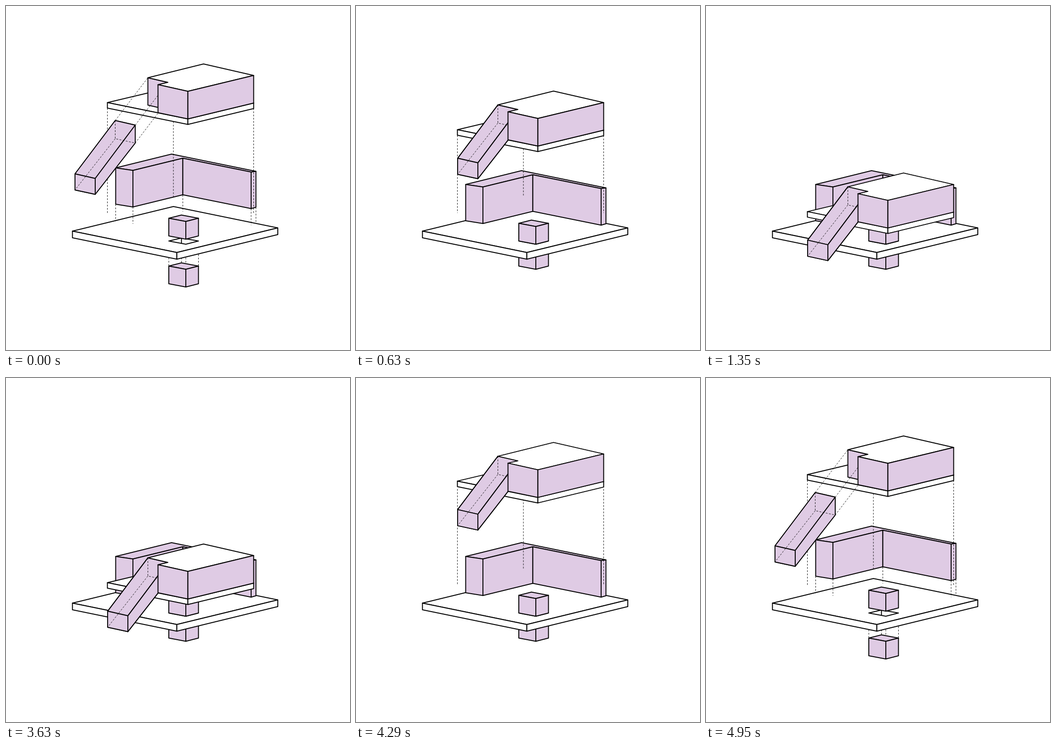
An HTML page with a canvas that plays this animation: 748 by 748 pixels, repeating every 6300 ms.

```html
<!DOCTYPE html>
<html>
<head>
<meta charset="utf-8">
<style>
html, body { margin: 0; width: 100%; height: 100%; overflow: hidden; background: #fff; }
canvas { display: block; }
</style>
</head>
<body>
<canvas width="748" height="748"></canvas>
<script>
const ctx = document.querySelector('canvas').getContext('2d');
const LOOP = 6300, REOPEN = 3600, MOVE = 1350, STEP = 30;
const LILAC = '#dfcbe4', WHITE = '#fff';

// cubic-bezier(.37, .1, .2, 1), solved by bisection
function ease(x) {
  if (x <= 0) return 0;
  if (x >= 1) return 1;
  const curve = (s, a, b) => 3 * (1 - s) ** 2 * s * a + 3 * (1 - s) * s * s * b + s ** 3;
  let lo = 0, hi = 1;
  for (let i = 0; i < 24; i++) {
    const mid = (lo + hi) / 2;
    if (curve(mid, .37, .2) < x) lo = mid; else hi = mid;
  }
  return curve(lo, .1, 1);
}

function path(pts, dx, dy) {
  ctx.beginPath();
  pts.forEach(([x, y]) => ctx.lineTo(x + dx, y + dy));
}

function face(fill, pts, dy = 0, dx = 0) {
  path(pts, dx, dy);
  ctx.closePath();
  ctx.fillStyle = fill;
  ctx.fill();
  ctx.lineWidth = 2;
  ctx.stroke();
}

function dash(pts, dy = 0, dx = 0) {
  path(pts, dx, dy);
  ctx.setLineDash([4, 3]);
  ctx.lineWidth = .9;
  ctx.stroke();
  ctx.setLineDash([]);
}

function drop(x, top, bottom) {
  if (bottom - top > .5) dash([[x, top], [x, bottom]]);
}

// Upright face standing below the edge a-b
function side(fill, a, b, ha, dy, hb = ha) {
  face(fill, [a, b, [b[0], b[1] + hb], [a[0], a[1] + ha]], dy);
}

function cube(dy) {
  const l = [354, 461.5], b = [381.5, 454.5], r = [418.5, 461.5], f = [391, 468.5];
  face(LILAC, [l, b, r, f], dy);
  side(LILAC, l, f, 38.5, dy);
  side(LILAC, f, r, 38.5, dy);
}

function base() {
  const l = [144.5, 489.5], f = [371.5, 536], r = [591, 482.5];
  face(WHITE, [l, [364, 436], r, f]);
  side(WHITE, l, f, 14.5, 0);
  side(WHITE, f, r, 14.5, 0);
  face(WHITE, [[354, 511], [381.5, 504.5], [418.5, 511], [391, 518]]);
  path([[381.5, 504.5], [381.5, 516]], 0, 0);
  ctx.stroke();
}

function walls(dy) {
  const l = [238.5, 352], a = [276, 357.5], inner = [384.5, 331], b = [533, 361], r = [543.5, 359.5];
  drop(238.5, 431 + dy, 468);
  drop(276, 437 + dy, 473.5);
  drop(384.5, 411 + dy, 447);
  drop(533, 440.5 + dy, 476.5);
  drop(543.5, 437.5 + dy, 473);
  face(LILAC, [l, [360, 322], r, b, inner, a], dy);
  side(LILAC, l, a, 79, dy, 79.5);
  side(LILAC, a, inner, 79.5, dy);
  side(LILAC, inner, b, 79.5, dy);
  side(LILAC, b, r, 79.5, dy, 78);
}

function terrace(dy) {
  const l = [220.5, 210], f = [395.5, 245.5], r = [538.5, 211];
  face(WHITE, [l, [364, 176], r, f], dy);
  side(WHITE, l, f, 12, dy);
  side(WHITE, f, r, 12, dy);
  side(LILAC, [308.5, 156], [352, 166], 59.5, dy);
}

function chute(joined, dy) {
  const dx = 71 * joined, y = dy - 93 * joined;
  const a = [237.5, 249], b = [281, 259], c = [281, 298], d = [237.5, 288.5];
  const e = [150, 365], f = [194, 375], g = [194, 409.5], h = [150, 400];
  if (joined < .995) for (const p of [a, b, c])
    dash([[p[0] + dx, p[1] + y], [p[0] + 71, p[1] - 93 + dy]]);
  face(LILAC, [a, b, c, g, h, e], y, dx);
  face(LILAC, [a, b, f, e], y, dx);
  face(LILAC, [b, c, g, f], y, dx);
  face(LILAC, [e, f, g, h], y, dx);
  dash([a, d, c], y, dx);
  dash([d, h], y, dx);
}

function house(dy) {
  const l = [330.5, 171], f = [395.5, 185.5], r = [538.5, 151];
  face(WHITE, [[429.5, 126], r, f, l, [352, 166], [308.5, 156]], dy);
  side(LILAC, l, f, 61, dy, 60);
  side(LILAC, f, r, 60, dy);
}

function draw(time) {
  const t = Math.floor(time % LOOP / STEP) * STEP;
  const closing = t < REOPEN;
  const u = Math.min(closing ? t : t - REOPEN, MOVE);
  // 0 = pulled apart, 1 = assembled
  const joined = (closeAt, openAt, length) =>
    closing ? ease((u - closeAt) / length) : 1 - ease((u - openAt) / length);

  const roof = 237.5 * joined(407, 0, 1000);
  const guide = 237.5 * joined(407, 43, 1000);
  const lower = 104 - 38.5 * joined(0, 860, 480);

  ctx.fillStyle = WHITE;
  ctx.fillRect(0, 0, 748, 748);
  ctx.strokeStyle = '#000';
  ctx.lineJoin = 'round';

  drop(354, 526, 461.5 + lower);
  drop(381.5, 519, 454.5 + lower);
  drop(391, 533, 468.5 + lower);
  drop(418.5, 526, 461.5 + lower);
  cube(lower);
  base();
  walls(36 * joined(0, 848, 480));
  cube(11 * joined(0, 874, 480));
  drop(220.5, 222 + guide, 450);
  drop(364, 188 + guide, 415);
  drop(538.5, 222 + guide, 450);
  terrace(roof);
  chute(joined(0, 876, 480), roof);
  house(roof);
}

const start = performance.now();
(function tick() {
  draw(performance.now() - start);
  requestAnimationFrame(tick);
})();
</script>
</body>
</html>
```
